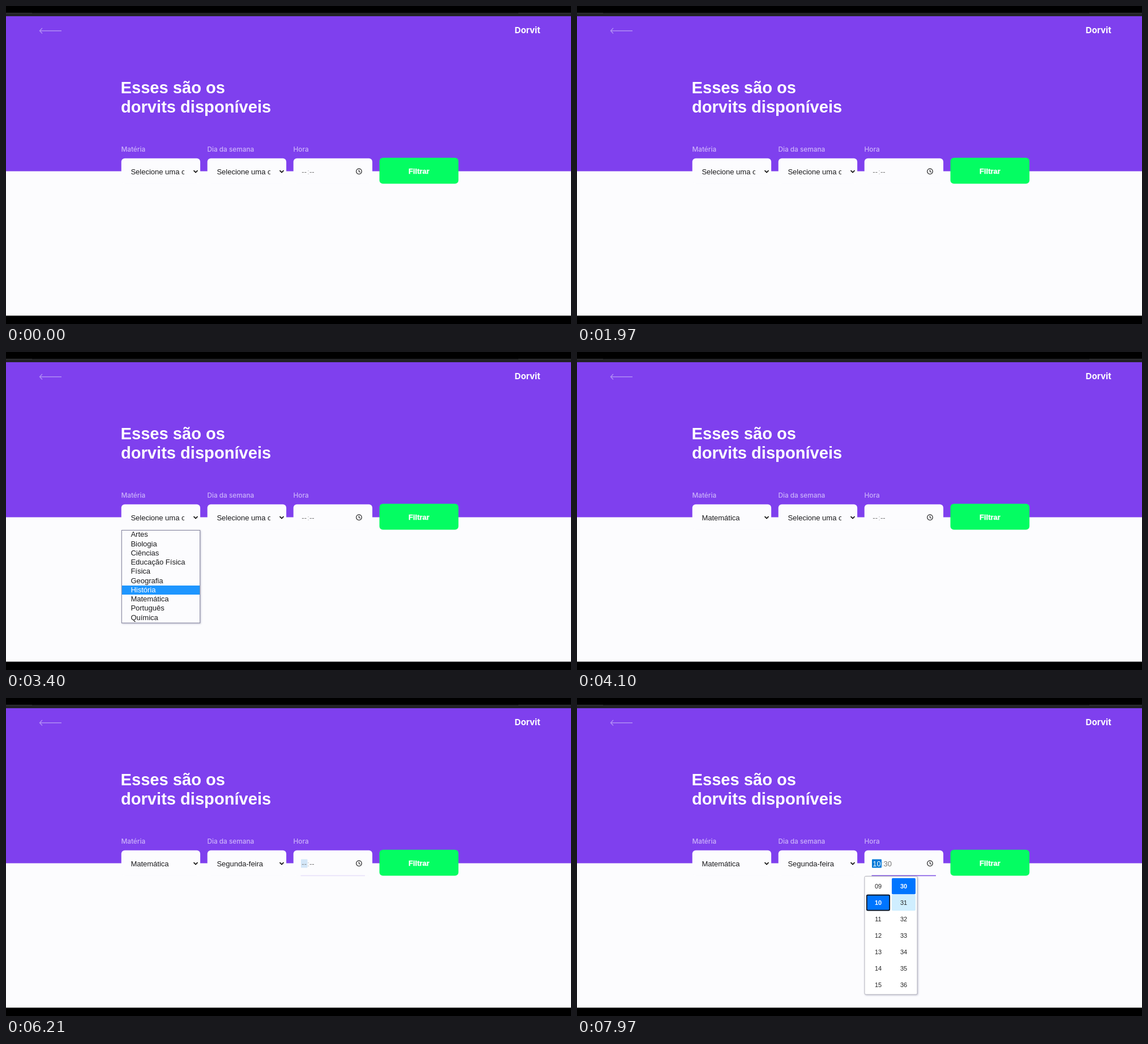
An HTML page that plays this animation: 998x561 px, repeating every 8 s.

```html
<!DOCTYPE html>
<html lang="pt-BR">
<head>
<meta charset="utf-8">
<title>Busca de professores</title>
<style>
  html, body { margin: 0; width: 100%; height: 100%; overflow: hidden; background: #000; }
  svg { display: block; width: 100vw; height: 100vh; }
  text { font-family: "Liberation Sans", Arial, sans-serif; font-size: 13px; fill: #1a1a1c; white-space: pre; }
  .title { font-size: 29.1px; font-weight: 700; fill: #fff; }
  .label { font: 500 11.8px Inter, sans-serif; fill: #ccb3fa; }
  .brand { font: 700 15.1px Inter, sans-serif; fill: #fff; }
  .button { font-weight: 700; fill: #fff; stroke: #fff; stroke-width: .3px; }
  .cell { font-size: 11px; text-anchor: middle; }
  .popup { filter: drop-shadow(1px 1.5px 1.5px rgba(50, 50, 100, .3)); }
</style>
</head>
<body>
<svg id="stage" viewBox="0 0 998 561" preserveAspectRatio="none">
  <defs>
    <clipPath id="clip0"><rect x="204" y="270" width="111" height="44"/></clipPath>
    <clipPath id="clip1"><rect x="356" y="270" width="111" height="44"/></clipPath>
  </defs>
  <rect width="998" height="561"/>
  <rect y="12" width="998" height="6" fill="#222226"/>
  <path d="M0 12.5H46M905 12.5H998" stroke="#3a3a3e"/>
  <rect y="18" width="998" height="274" fill="#7f40ee"/>
  <rect y="291.5" width="998" height="254.8" fill="#fcfcfe"/>
  <path d="M98 43.7H59.5M64 39L59.5 43.7L64 48.4" fill="none" stroke="#b08df5" stroke-width="1.4"/>
  <text class="brand" x="898.5" y="48">Dorvit</text>
  <text class="title" x="202.6" y="154">Esses são os</text>
  <text class="title" x="203" y="187.5">dorvits disponíveis</text>
  <g id="form"></g>
  <rect x="659.6" y="267.7" width="139.6" height="45.8" rx="6" fill="#04fd62"/>
  <text class="button" x="711" y="295.7">Filtrar</text>
  <g id="popups"></g>
</svg>
<script>
const LOOP = 8000, FADE = 80, ROW = 16.25;
const form = document.getElementById('form');
const popups = document.getElementById('popups');

function add(parent, tag, attrs, text) {
  const el = document.createElementNS('http://www.w3.org/2000/svg', tag);
  for (const k in attrs) el.setAttribute(k, attrs[k]);
  if (text !== undefined) el.textContent = text;
  parent.appendChild(el);
  return el;
}
const show = (el, on) => el.setAttribute('visibility', on ? 'visible' : 'hidden');
const ramp = (t, start) => Math.min(1, Math.max(0, (t - start) / FADE));
const mix = (a, b, k) => `rgb(${a.map((v, i) => Math.round(v + (b[i] - v) * k))})`;
const INK = [26, 26, 28], WHITE = [255, 255, 255], GREY = [117, 117, 117];

// Form fields
['Matéria', 'Dia da semana', 'Hora'].forEach((name, i) => {
  const x = 204 + i * 152;
  add(form, 'text', { class: 'label', x: x - 0.5, y: 257 }, name);
  add(form, 'rect', { x: x - 0.3, y: 268.7, width: 139.4, height: 45, rx: 6, fill: '#fcfcfe' });
});

// hover: [time, row] steps; the last hovered row is the one chosen
function makeSelect(i, options, open, close, hover) {
  const x = 204 + i * 152, h = options.length * ROW + 2;
  const value = add(form, 'text', { x: x + 16.4, y: 296.5, 'clip-path': `url(#clip${i})` });
  add(form, 'path', { d: `M${x + 127.5} 290.1l3.5 3.5l3.5-3.5`, fill: 'none', stroke: '#111', 'stroke-width': 1.7 });
  const list = add(popups, 'g', {});
  add(list, 'rect', { class: 'popup', x: x + 0.3, y: 314.5, width: 138.4, height: h - 1, fill: '#fcfcfe', stroke: '#80809a' });
  const rows = options.map((name, r) => {
    const y = 314.5 + r * ROW;
    return {
      bar: add(list, 'rect', { x: x + 0.8, y, width: 137.4, height: 16, fill: '#1e96ff' }),
      text: add(list, 'text', { x: x + 16.4, y: y + 11.8 }, name)
    };
  });
  const chosen = options[hover[hover.length - 1][1]];
  return t => {
    value.textContent = t >= close ? chosen : 'Selecione uma opção';
    show(list, t >= open && t < close);
    rows.forEach((row, r) => {
      const s = hover.findIndex(step => step[1] === r);
      let k = 0;
      if (s >= 0) k = ramp(t, hover[s][0]) - (hover[s + 1] ? ramp(t, hover[s + 1][0]) : 0);
      row.bar.setAttribute('opacity', k);
      row.text.style.fill = mix(INK, WHITE, k);
    });
  };
}

function makeTime(focus, open, pick, leave) {
  const line = add(form, 'rect', { x: 520.5, y: 312.6, width: 113.5, height: 1.6, fill: '#8257e5' });
  const mark = add(form, 'rect', { x: 521, y: 284.5, height: 15, rx: 1, fill: '#0078d7' });
  const hour = add(form, 'text', { x: 522.3, y: 296.5 });
  const colon = add(form, 'text', { y: 296.5 }, ':');
  const minute = add(form, 'text', { y: 296.5 });
  colon.style.fill = '#b9b9bd';
  minute.style.fill = '#757575';
  add(form, 'path', {
    d: 'M618.7 291.7a4.8 4.8 0 1 0 9.6 0a4.8 4.8 0 1 0-9.6 0M623.5 289V292l2.2 1.3',
    fill: 'none', stroke: '#1a1a1c', 'stroke-width': 1.15
  });

  const panel = add(popups, 'g', {});
  add(panel, 'rect', { class: 'popup', x: 508, y: 314.5, width: 93, height: 208.5, rx: 2, fill: '#fff', stroke: '#b4b4bc' });
  const column = (x, first) => Array.from({ length: 7 }, (_, r) => ({
    box: add(panel, 'rect', { x, y: 317.8 + r * 29, width: 42, height: 28.4, rx: 2 }),
    text: add(panel, 'text', { class: 'cell', x: x + 21, y: 336 + r * 29 }, String(first + r).padStart(2, '0'))
  }));
  const hours = column(511, 9), minutes = column(556, 30);
  const ring = add(panel, 'rect', { x: 511.8, y: 347.6, width: 40.4, height: 27, rx: 2, fill: 'none', stroke: '#101010', 'stroke-width': 1.7 });

  const paint = (cells, selected, hovered) => cells.forEach(({ box, text }, r) => {
    const on = r === selected;
    box.setAttribute('fill', on ? '#0075ff' : r === hovered ? '#cfeeff' : 'none');
    text.style.fill = on ? '#fff' : '#222';
    text.style.fontWeight = on ? 700 : 400;
  });

  return t => {
    const k = ramp(t, focus), set = t >= pick;
    line.setAttribute('opacity', k);
    mark.setAttribute('opacity', k);
    mark.setAttribute('width', set ? 17 : 11.5);
    hour.textContent = set ? '10' : '--';
    minute.textContent = set ? '30' : '--';
    hour.style.fill = mix(GREY, WHITE, k);
    colon.setAttribute('x', set ? 538 : 532.3);
    minute.setAttribute('x', set ? 541.6 : 536);
    show(panel, t >= open);
    ring.setAttribute('visibility', set ? 'inherit' : 'hidden');
    paint(hours, set ? 1 : 0, !set && t > pick - 250 ? 1 : -1);
    paint(minutes, 0, t >= leave ? 1 : -1);
  };
}

const parts = [
  makeSelect(0, ['Artes', 'Biologia', 'Ciências', 'Educação Física', 'Física', 'Geografia',
    'História', 'Matemática', 'Português', 'Química'], 2300, 3900,
    [[3060, 1], [3130, 3], [3200, 4], [3260, 5], [3310, 6], [3560, 7]]),
  makeSelect(1, ['Domingo', 'Segunda-feira', 'Terça-feira', 'Quarta-feira', 'Quinta-feira',
    'Sexta-feira', 'Sábado'], 4600, 5500, [[4963, 0], [5120, 1]]),
  makeTime(6198, 6500, 7250, 7700)
];

function draw(t) {
  parts.forEach(update => update(t));
}
const start = performance.now();
function tick(now) {
  draw(Math.max(0, now - start) % LOOP);
  requestAnimationFrame(tick);
}
draw(0);
requestAnimationFrame(tick);
</script>
</body>
</html>
```
